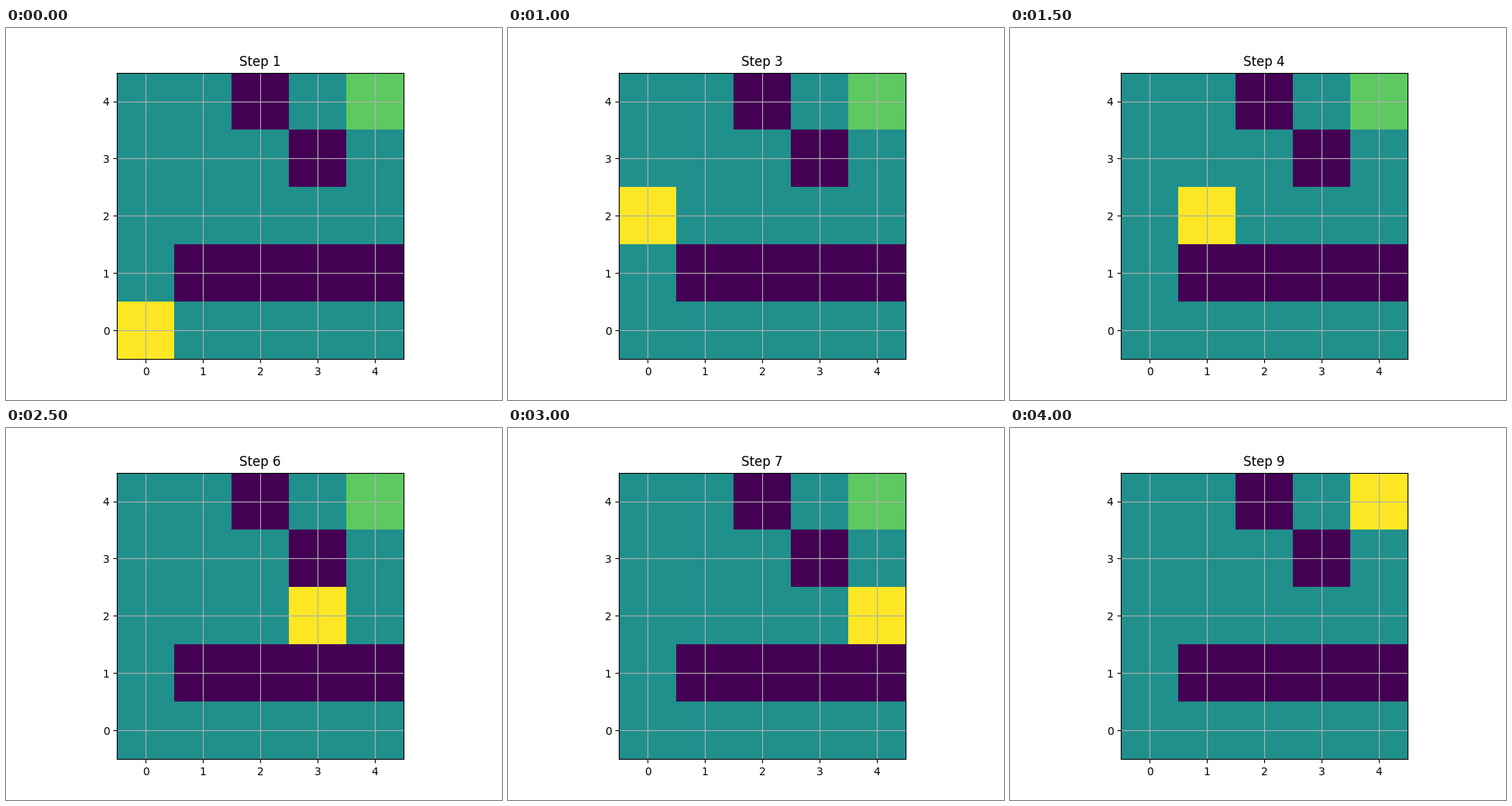
A matplotlib script that plays this animation: 640x480 px, repeating every 4.5 s.

```python
import numpy as np
import matplotlib.pyplot as plt
from matplotlib.animation import FuncAnimation

SIZE = 5
WALL, FREE, GOAL, AGENT = -1, 0, 0.5, 1

# Cells are (column, row): up the left side, across, then up to the goal.
path = ([(0, y) for y in range(3)]
        + [(x, 2) for x in range(1, SIZE)]
        + [(4, y) for y in range(3, SIZE)])

world = np.full((SIZE, SIZE), FREE, dtype=float)
world[1, 1:] = WALL
world[3, 3] = WALL
world[4, 2] = WALL
world[4, 4] = GOAL

fig, ax = plt.subplots(figsize=(6.4, 4.8), dpi=100)
image = ax.imshow(world, cmap="viridis", origin="lower",
                  vmin=WALL, vmax=AGENT, interpolation="nearest")
ax.set_xticks(range(SIZE))
ax.set_yticks(range(SIZE))
ax.grid(True)
title = ax.set_title("Step 1")


def draw(step):
    x, y = path[step]
    cells = world.copy()
    cells[y, x] = AGENT
    image.set_data(cells)
    title.set_text(f"Step {step + 1}")
    return image, title


anim = FuncAnimation(fig, draw, frames=len(path), interval=500,
                     repeat=True, repeat_delay=0, blit=False)
plt.show()
```
